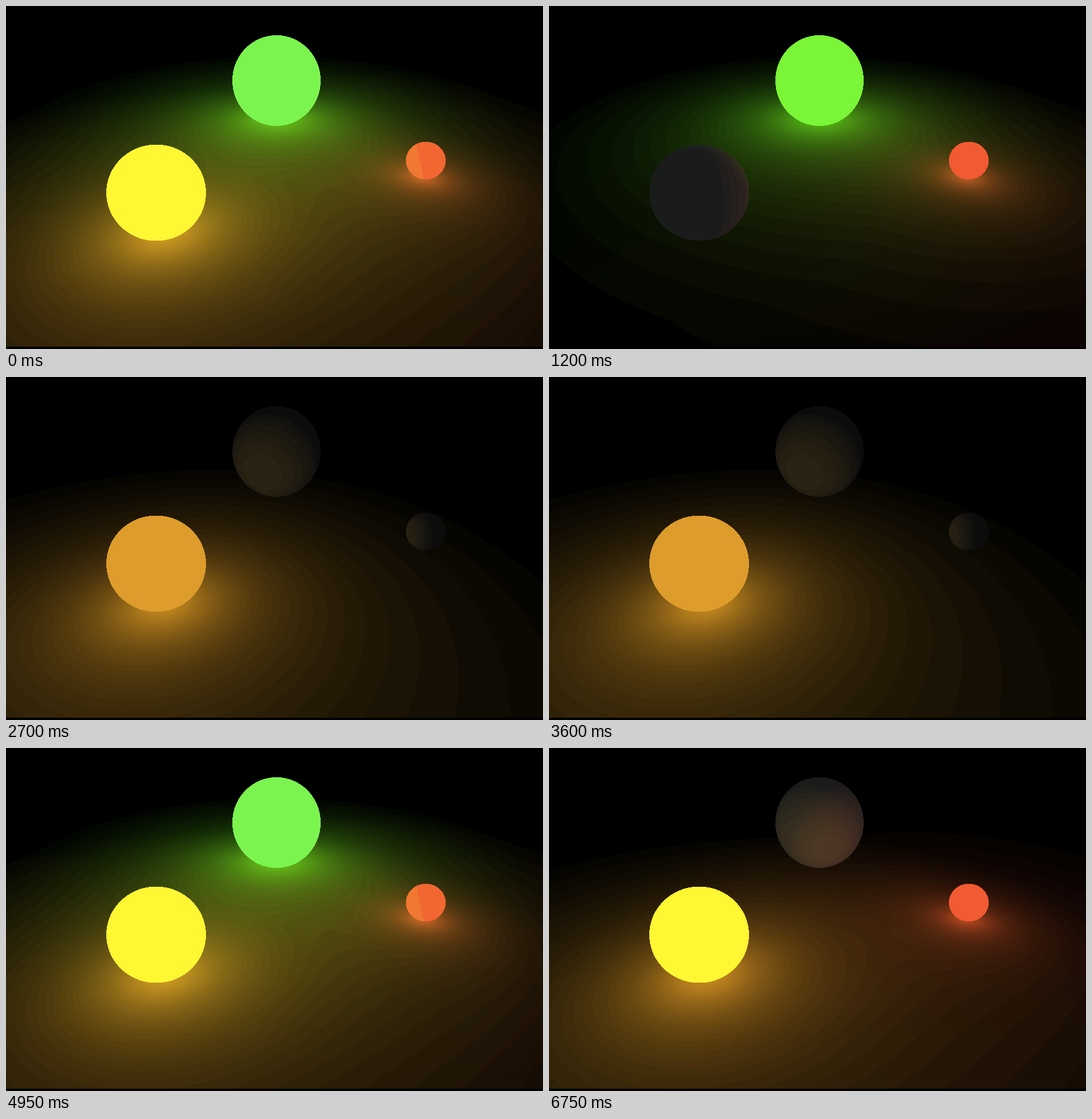
Recreate the animation shown at these times as an HTML page with a canvas. Size 937x598 px, loop 6.87 s.

```html
<!DOCTYPE html>
<html lang="en">
<head>
<meta charset="utf-8">
<title>Three lamps</title>
<style>
html, body { margin: 0; width: 100%; height: 100%; overflow: hidden; background: #000; }
canvas { display: block; width: 937px; height: 598px; }
</style>
</head>
<body>
<canvas id="stage" width="937" height="598"></canvas>
<script>
const W = 937, H = 598, STEP = 150, LOOP = 6870;
const ctx = document.getElementById('stage').getContext('2d');

// Camera one unit above the floor, pitched down 30 degrees.
const FOCAL = 722, SIN = 0.5, COS = Math.sqrt(0.75);
const FLOOR_TOP = 36, FLOOR_END = 594, REACH = 1.8;

// Screen ellipse, floor position, radius, light tint, floor and sphere gain,
// and the glowing colour with one, two or three lamps lit.
const lamps = [
  { cx: 262, cy: 325.5, rx: 87, ry: 84, X: -0.436, Z: 1.2955, r: 0.178,
    tint: [1, 0.7, 0.16], floor: 192, gain: 50,
    glow: [[221, 156, 44], [255, 247, 51], [255, 247, 51]] },
  { cx: 732.5, cy: 269.5, rx: 34.8, ry: 32.8, X: 0.717, Z: 1.737, r: 0.088,
    tint: [1, 0.37, 0.18], floor: 165, gain: 45,
    glow: [[240, 80, 45], [241, 90, 50], [242, 102, 50]] },
  { cx: 472, cy: 130, rx: 77, ry: 79, X: 0.014, Z: 2.48, r: 0.26,
    tint: [0.43, 1, 0.12], floor: 178, gain: 40,
    glow: [[120, 240, 45], [122, 245, 55], [124, 244, 80]] }
];

// Bits: 1 yellow, 2 red, 4 green. The second half mirrors the first.
const half = [7, 0, 7, 0, 1, 3, 7, 7, 6, 7];
const cycle = half.concat(half.map(m => 7 - m));

function add(rgb, tint, k) {
  for (let i = 0; i < 3; i++) rgb[i] += tint[i] * k;
}

function band(rgb) {
  const top = Math.max(...rgb);
  const k = top < 5 ? 0 : (Math.floor(top / 5) * 5 + 2) / top;
  return rgb.map(v => v * k);
}

function floorColor(x, y, lit) {
  const u = x - W / 2, v = y - H / 2;
  const den = FOCAL * SIN + v * COS;
  const X = u / den, Z = (FOCAL * COS - v * SIN) / den;
  const rgb = [0, 0, 0];
  for (const l of lit) {
    const d2 = (X - l.X) ** 2 + (Z - l.Z) ** 2;
    const fade = 1 - d2 / (REACH * REACH);
    if (fade > 0) add(rgb, l.tint, l.floor * fade * l.r / Math.sqrt(d2 + l.r * l.r));
  }
  return band(rgb);
}

function sphereColor(s, nx, ny, lit) {
  const count = lit.length;
  if (lit.includes(s)) {
    const warm = s === lamps[1] && count === 3 && nx < -0.3 + ny * -0.2;
    return warm ? [240, 120, 50] : s.glow[count - 1];
  }
  const nz = Math.sqrt(Math.max(0, 1 - nx * nx - ny * ny));
  const n = [nx, ny * COS + nz * SIN, ny * SIN - nz * COS];
  const rgb = [13 * count, 13.5 * count, 13.5 * count];
  for (const l of lit) {
    const to = [l.X - s.X, l.r - s.r, l.Z - s.Z];
    const dist = Math.hypot(...to);
    const facing = (n[0] * to[0] + n[1] * to[1] + n[2] * to[2]) / dist;
    if (facing > 0) add(rgb, l.tint, l.gain * facing * (1 - (dist - s.r) / 2.6));
  }
  return band(rgb);
}

function render(mask) {
  const lit = lamps.filter((l, i) => mask >> i & 1);
  const img = ctx.createImageData(W, H);
  const put = (x, y, c) => {
    const p = (y * W + x) * 4;
    for (let i = 0; i < 3; i++) img.data[p + i] = c[i];
  };
  for (let p = 3; p < img.data.length; p += 4) img.data[p] = 255;
  if (!mask) return img;

  for (let y = FLOOR_TOP; y < FLOOR_END; y++)
    for (let x = 0; x < W; x++) put(x, y, floorColor(x, y, lit));

  for (const s of lamps)
    for (let y = Math.floor(s.cy - s.ry); y <= s.cy + s.ry; y++)
      for (let x = Math.floor(s.cx - s.rx); x <= s.cx + s.rx; x++) {
        const nx = (x + 0.5 - s.cx) / s.rx, ny = (s.cy - y - 0.5) / s.ry;
        if (nx * nx + ny * ny <= 1) put(x, y, sphereColor(s, nx, ny, lit));
      }
  return img;
}

const scenes = {};
for (const m of new Set(cycle)) scenes[m] = render(m);

let shown = -1;
const start = performance.now();
function draw(now) {
  const t = Math.max(0, now - start) % LOOP;
  const mask = cycle[Math.floor(t / STEP) % cycle.length];
  if (mask !== shown) ctx.putImageData(scenes[shown = mask], 0, 0);
  requestAnimationFrame(draw);
}
draw(start);
</script>
</body>
</html>
```
